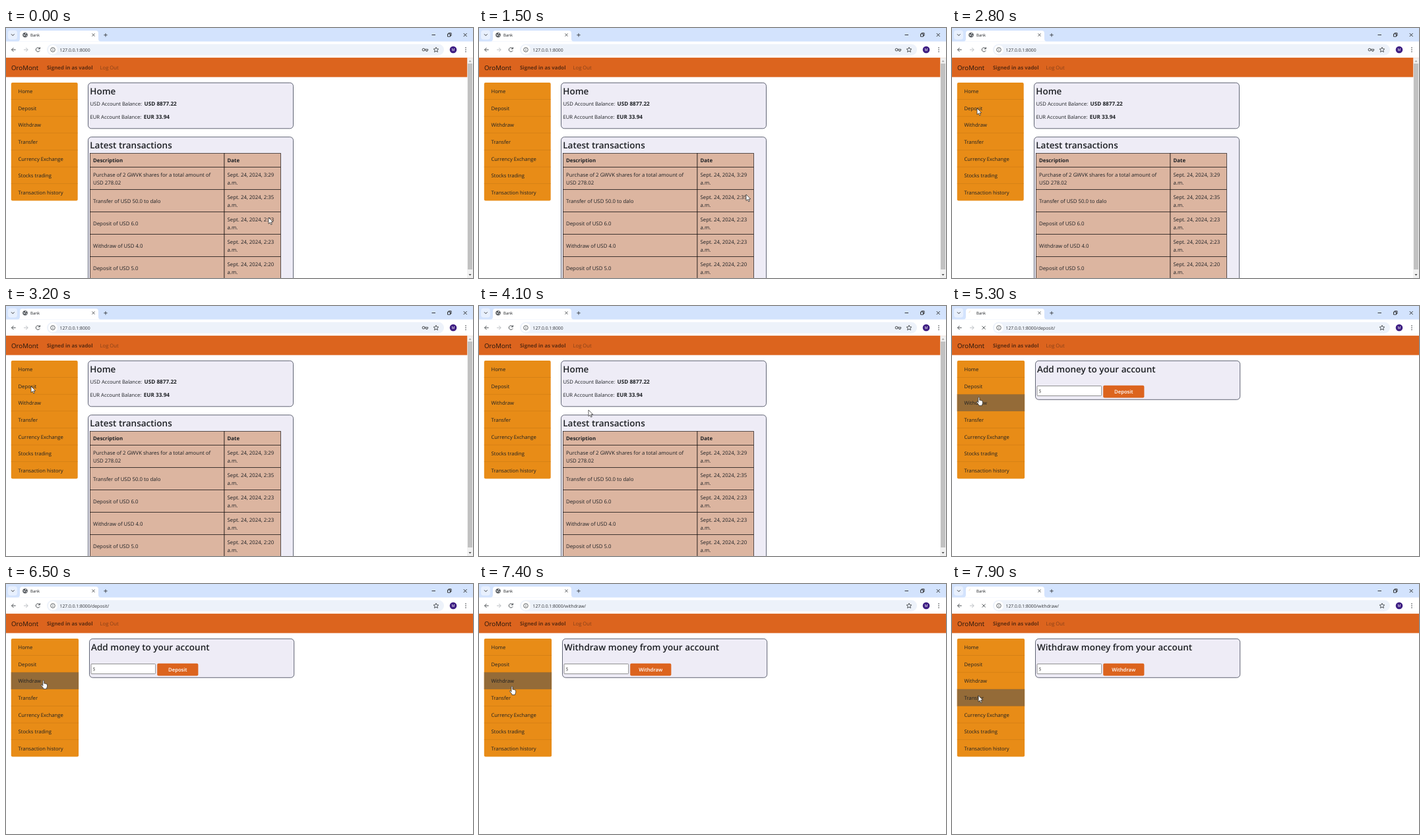
An HTML page for the animation above (8000 ms loop, 708 by 380 pixels).

```html
<!DOCTYPE html>
<html lang="en">
<head>
<meta charset="utf-8">
<title>Bank</title>
<style>
  html, body { margin: 0; width: 100%; height: 100%; overflow: hidden; background: #fff; }
  svg { display: block; width: 708px; height: 380px; }
  text { font-family: "Open Sans", "Noto Sans", sans-serif; font-size: 7.7px; fill: #1d2024; text-rendering: geometricPrecision; white-space: pre; }
  .td { font-size: 7.85px; }
  .b { font-weight: 700; font-size: 7.85px; }
  .sum { font-weight: 700; font-size: 8.2px; }
  .h { font-weight: 600; font-size: 13.5px; }
  .ico { fill: none; stroke: #3c4043; stroke-width: .9; }
  .card { fill: #eeecf6; stroke: #22283c; stroke-width: .7; }
  .cell { fill: #dcb5a0; stroke: #1c1614; stroke-width: .7; }
</style>
</head>
<body>
<svg id="stage" viewBox="0 0 708 380"></svg>
<script>
const LOOP = 8000, STEP = 100;
const MENU_TOP = 83, ITEM_H = 25.64;
const MENU = ["Home", "Deposit", "Withdraw", "Transfer", "Currency Exchange", "Stocks trading", "Transaction history"];
const ROWS = [
  [["Purchase of 2 GWVK shares for a total amount of", "USD 278.02"], "3:29"],
  [["Transfer of USD 50.0 to dalo"], "2:35"],
  [["Deposit of USD 6.0"], "2:23"],
  [["Withdraw of USD 4.0"], "2:23"],
  [["Deposit of USD 5.0"], "2:20"]
];
// Pointer keys: time, x, y
const PATH = [
  [0, 398, 288], [200, 405, 253], [1500, 405, 253], [2300, 240, 163], [2800, 38, 122],
  [3300, 38, 122], [3800, 591, 205], [4100, 166, 158], [4200, 141, 156], [4700, 39, 126],
  [4900, 39, 126], [5100, 41, 139], [5600, 41, 139], [6000, 200, 165], [6500, 57, 147],
  [7200, 57, 147], [7700, 40, 169.5], [LOOP, 40, 169.5]
];

const text = (x, y, s, attrs = "") => `<text x="${x}" y="${y}" ${attrs}>${s}</text>`;
const rect = (x, y, w, h, attrs = "") => `<rect x="${x}" y="${y}" width="${w}" height="${h}" ${attrs}/>`;
const icon = (d, attrs = "") => `<path class="ico" d="${d}" ${attrs}/>`;
const group = (id, body) => `<g id="${id}">${body}</g>`;

function browser() {
  return rect(0, 0, 708, 25, 'fill="#d3e3fd"') +
    rect(0, 20.5, 708, 25, 'fill="#fff"') +
    '<path d="M17 20.600q4 0 4-4V8q0-4 4-4h111q4 0 4 4v8.600q0 4 4 4z" fill="#fff"/>' +
    rect(3, 3.5, 14, 14, 'rx="4" fill="#e8f0fe"') +
    icon("M8 9.300l2.300 2.300 2.300-2.300", 'style="stroke:#222"') +
    text(37, 12.9, "Bank", 'style="font-size:6px"') +
    icon("M130.500 8.500l4 4m0-4l-4 4M151 8v5.400m-2.700-2.700h5.400") +
    icon("M645.500 10.500h5.500M669.500 9h4v4h-4zM671 9V7.700h4v4h-1.500M693.700 8l5 5m0-5l-5 5", 'style="stroke:#222"') +
    icon("M14.700 33H8.500m3-3l-3 3 3 3") +
    icon("M27 33h6.200m-3-3l3 3-3 3", 'style="stroke:#b4b7bb"') +
    rect(62, 24.5, 602, 17, 'rx="8.5" fill="#edf2fa"') +
    rect(64, 26, 14, 14, 'rx="7" fill="#fff"') +
    '<circle class="ico" cx="71" cy="33" r="3.300" style="stroke-width:.8"/>' +
    icon("M71 32.500v2.200M71 30.900v.8", 'style="stroke-width:.8"') +
    '<text id="url" x="81.500" y="35.500" style="font-size:6.8px;fill:#303236"></text>' +
    icon("M652 29.300l1.100 2.400 2.700.3-2 1.800.6 2.700-2.400-1.400-2.400 1.400.6-2.700-2-1.800 2.700-.3z") +
    '<circle cx="678" cy="33" r="5.300" fill="#3f1f83"/>' +
    text(678, 35.1, "M", 'text-anchor="middle" style="font-size:5.600px;fill:#fff"') +
    [30, 33, 36].map(y => `<circle cx="697" cy="${y}" r=".8" fill="#3c4043"/>`).join("") +
    group("idle",
      '<circle cx="29" cy="10.600" r="3.700" fill="#484c50"/>' +
      '<path d="M26.300 9.200l2 .8.300 1.500-1 1.400zM28.800 7.700l2.300.7-.6 1.400-1.500-.2zM30 10.900l1.600.2-1 2-1-.8z" fill="#eef2f6"/>' +
      icon("M51.100 31.300a3.100 3.100 0 1 0 .1 3M51.500 29.200v2.600h-2.600")) +
    group("busy",
      '<path d="M25.900 10.500a3.100 3.100 0 0 1 2-2.900" fill="none" stroke="#e8cfae" stroke-width=".7"/>' +
      icon("M45.700 30.500l5 5m0-5l-5 5"));
}

function navbar() {
  return rect(0, 45.1, 708, 29.5, 'fill="#dc641e"') +
    text(8, 64, "OroMont", 'style="font-size:9.700px;fill:#21150d"') +
    text(62, 63.2, "Signed in as vadol", 'class="b" style="fill:#5f2d11"') +
    text(142.5, 63.2, "Log Out", 'style="fill:#87421a"');
}

function sidebar() {
  const lines = MENU.slice(1).map((_, i) =>
    rect(7.8, MENU_TOP + (i + 1) * ITEM_H - .4, 100, .6, 'class="wide" fill="#cb7b14"')).join("");
  const labels = MENU.map((s, i) => text(18.5, (MENU_TOP + i * ITEM_H + 16.1).toFixed(2), s)).join("");
  return rect(7.8, MENU_TOP, 100, 179.5, 'class="wide" rx="2" fill="#e88c17"') +
    lines + rect(7.8, 0, 100, ITEM_H, 'class="wide" id="hover" fill="#946b38"') + labels;
}

function home() {
  const cells = (y, h) => rect(127.5, y, 203.5, h, 'class="cell"') + rect(331, y, 85.5, h, 'class="cell"');
  const rows = ROWS.map(([lines, time], i) => {
    const y = 211.5 + i * 34;
    const first = y + (lines.length > 1 ? 14.1 : 20.3);
    return cells(y, 34) +
      lines.map((s, k) => text(132, first + k * 12.5, s, 'class="td"')).join("") +
      text(335.5, y + 14.1, `Sept. 24, 2024, ${time}`, 'class="td"') +
      text(335.5, y + 26.6, "a.m.", 'class="td"');
  }).join("");
  return rect(124.5, 83.3, 311, 69.5, 'class="card" rx="5"') +
    text(127.3, 100.5, "Home", 'class="h"') +
    text(127.5, 117.6, "USD Account Balance: ") + text(209.5, 117.6, "USD 8877.22", 'class="sum"') +
    text(127.5, 138.3, "EUR Account Balance: ") + text(208.7, 138.3, "EUR 33.94", 'class="sum"') +
    rect(124.5, 165.7, 311, 260, 'class="card" rx="5"') +
    text(127.3, 183, "Latest transactions", 'class="h"') +
    cells(190.5, 21) + text(132, 203.9, "Description", 'class="b"') + text(335.5, 203.9, "Date", 'class="b"') +
    rows +
    rect(699.2, 45.1, 9, 335, 'fill="#f1f1f1"') + rect(700, 54, 7, 313, 'fill="#c1c1c1"') +
    '<path d="M701.500 51.500l2-2.500 2 2.500z" fill="#a3a3a3"/><path d="M701.500 374l2 2.500 2-2.500z" fill="#505050"/>' +
    '<g class="ico"><circle cx="633" cy="33" r="1.900"/><path d="M635 32.300h4.700v1.700h-1v1.200h-1.600V34H635"/></g>';
}

function form() {
  return rect(126.5, 83.3, 310.2, 59, 'class="card" rx="5"') +
    '<text id="title" class="h" x="129" y="100.500"></text>' +
    rect(129, 121.5, 97.7, 15, 'rx="1" fill="#fff" stroke="#777" stroke-width=".8"') +
    text(131.3, 132, "$", 'style="fill:#777"') +
    rect(229.2, 120.8, 62.2, 18.6, 'rx="2" fill="#dc641e"') +
    '<text id="action" x="260.300" y="133" text-anchor="middle" style="fill:#fff;font-weight:600"></text>';
}

function pointer() {
  return group("arrow", '<path d="M0 0v9.600l2.200-2 1.600 3.400 1.500-.7-1.600-3.300h3.100z" fill="#fff" stroke="#222" stroke-width=".7"/>') +
    group("hand", '<path d="M-1.200 7V.800Q-1.200-.4-.2-.4T.8.800v3.500q1.200-.7 1.800.4 1.200-.5 1.600.5 1.300-.3 1.300 1v2.500q0 1.200-1 2.400v1.400h-4.800V11.200L-3.500 7.500q-.6-1.200.5-1.500.8 0 1.800 1.800z" fill="#fff" stroke="#222" stroke-width=".7"/>');
}

const stage = document.getElementById("stage");
stage.innerHTML = rect(0, 0, 708, 380, 'fill="#fff"') + browser() + navbar() + sidebar() +
  group("home", home()) + group("form", form()) + group("pointer", pointer());

const el = id => document.getElementById(id);
const show = (id, on) => el(id).setAttribute("display", on ? "inline" : "none");
const wide = [...document.querySelectorAll(".wide")];

function pointerAt(t) {
  const i = PATH.findIndex(k => k[0] > t);
  const [t0, x0, y0] = PATH[i - 1], [t1, x1, y1] = PATH[i];
  const p = (t - t0) / (t1 - t0);
  return [x0 + (x1 - x0) * p, y0 + (y1 - y0) * p];
}

function draw(t) {
  const isHome = t < 5300;
  const action = t < 6700 ? "Deposit" : "Withdraw";
  const busy = (t >= 5000 && t < 5400) || t >= 7900;
  const [x, y] = pointerAt(t);
  const onMenu = x < 108 && t >= 4500;

  show("home", isHome);
  show("form", !isHome);
  show("idle", !busy);
  show("busy", busy);
  el("url").textContent = "127.0.0.1:8000" + (isHome ? "" : `/${action.toLowerCase()}/`);
  el("title").textContent = action === "Deposit" ? "Add money to your account" : "Withdraw money from your account";
  el("action").textContent = action;
  wide.forEach(r => r.setAttribute("width", isHome ? 100.9 : 102.3));

  show("hover", onMenu && !(t >= 5000 && isHome));
  el("hover").setAttribute("y", MENU_TOP + Math.floor((y - MENU_TOP) / ITEM_H) * ITEM_H);

  const hand = onMenu && t < 7900;
  show("hand", hand);
  show("arrow", !hand);
  el("pointer").setAttribute("transform", `translate(${x} ${y})`);
}

function tick() {
  const t = performance.now() % LOOP;
  draw(Math.floor(t / STEP) * STEP);
  requestAnimationFrame(tick);
}
tick();
</script>
</body>
</html>
```
